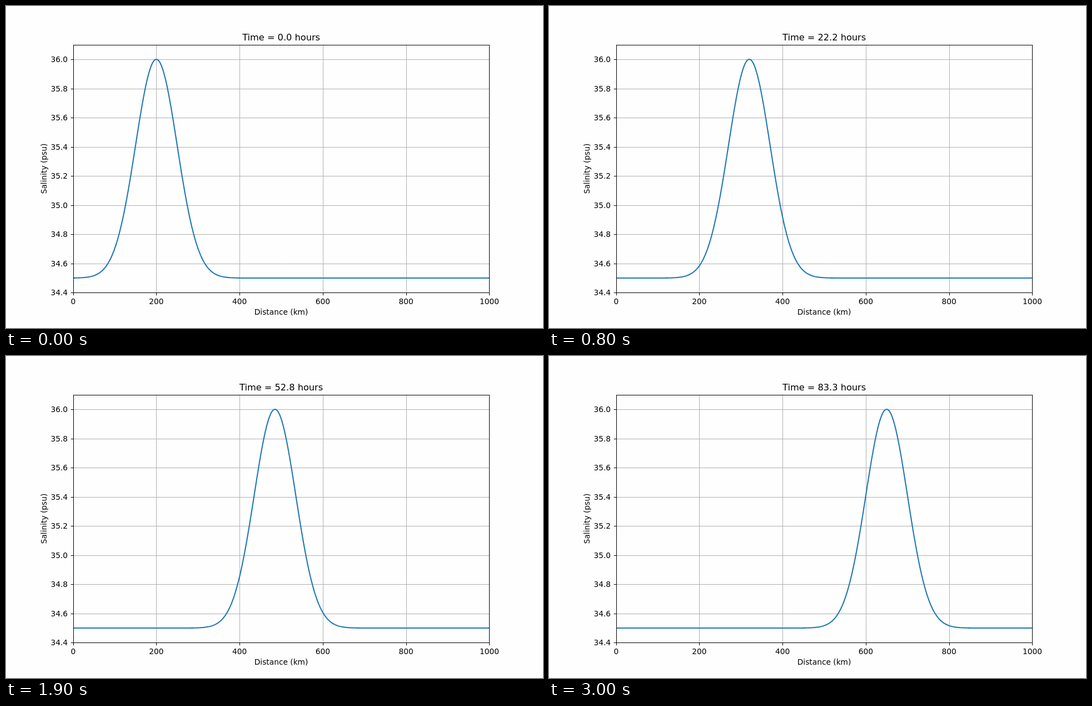
Write an HTML page with a canvas that moves like this. It is 966 by 580 pixels and loops after 3100 ms.

```html
<!DOCTYPE html>
<html lang="en">
<head>
<meta charset="utf-8">
<title>Salinity advection</title>
<style>
  html, body { margin: 0; width: 100%; height: 100%; overflow: hidden; background: #fefefe; }
  canvas { display: block; }
</style>
</head>
<body>
<canvas id="stage" width="966" height="580"></canvas>
<script>
const ctx = document.getElementById('stage').getContext('2d');
const W = 966, H = 580, PT = 100 / 72;
const LEFT = W * 0.125, RIGHT = W * 0.9, TOP = 69.7, BOTTOM = 516.3;
const MID_X = (LEFT + RIGHT) / 2, MID_Y = (TOP + BOTTOM) / 2;
const TICK = 3.5 * PT;
const STEP_MS = 100, STEPS = 31;
const STEP_KM = 15, STEP_HOURS = 10000 / 3600;
const BASE = 34.5, PEAK = 1.5, SIGMA = 50;

const toX = km => LEFT + (RIGHT - LEFT) * km / 1000;
const toY = psu => BOTTOM - (BOTTOM - TOP) * (psu - 34.4) / 1.7;
const snap = v => Math.floor(v + 0.5) + 0.5;
const xTicks = Array.from({ length: 6 }, (_, i) => i * 200);
const yTicks = Array.from({ length: 9 }, (_, i) => 34.4 + i * 0.2);

function line(x1, y1, x2, y2, color) {
  ctx.strokeStyle = color;
  ctx.lineWidth = 1;
  ctx.beginPath();
  ctx.moveTo(x1, y1);
  ctx.lineTo(x2, y2);
  ctx.stroke();
}

function label(text, x, y, align = 'center', size = 13.75) {
  ctx.font = `${size}px "DejaVu Sans", sans-serif`;
  ctx.textAlign = align;
  ctx.fillStyle = '#000';
  ctx.fillText(text, x, y);
}

function drawGrid() {
  for (const km of xTicks) line(snap(toX(km)), TOP, snap(toX(km)), BOTTOM, '#b0b0b0');
  for (const psu of yTicks) line(LEFT, snap(toY(psu)), RIGHT, snap(toY(psu)), '#b0b0b0');
}

function drawCurve(center) {
  ctx.save();
  ctx.beginPath();
  ctx.rect(LEFT, TOP, RIGHT - LEFT, BOTTOM - TOP);
  ctx.clip();
  ctx.beginPath();
  for (let km = 0; km <= 1000; km += 2) {
    const d = (km - center) / SIGMA;
    ctx.lineTo(toX(km), toY(BASE + PEAK * Math.exp(-d * d / 2)));
  }
  ctx.strokeStyle = '#1f77b4';
  ctx.lineWidth = 1.5 * PT;
  ctx.lineJoin = 'round';
  ctx.stroke();
  ctx.restore();
}

function drawAxes() {
  const l = snap(LEFT), r = snap(RIGHT), t = snap(TOP), b = snap(BOTTOM);
  for (const km of xTicks) {
    const x = toX(km);
    line(snap(x), b, snap(x), b + TICK, '#000');
    label(String(km), x, 537);
  }
  for (const psu of yTicks) {
    const y = toY(psu);
    line(l - TICK, snap(y), l, snap(y), '#000');
    label(psu.toFixed(1), LEFT - 2 * TICK, Math.round(y + 5), 'right');
  }
  ctx.strokeStyle = '#000';
  ctx.lineWidth = 1;
  ctx.strokeRect(l, t, r - l, b - t);
}

function drawTitles(hours) {
  label('Distance (km)', MID_X, 556);
  label(`Time = ${hours.toFixed(1)} hours`, MID_X, 62, 'center', 16.2);
  ctx.save();
  ctx.translate(73, MID_Y);
  ctx.rotate(-Math.PI / 2);
  label('Salinity (psu)', 0, 0);
  ctx.restore();
}

function draw(step) {
  ctx.fillStyle = '#fefefe';
  ctx.fillRect(0, 0, W, H);
  drawGrid();
  drawCurve(200 + step * STEP_KM);
  drawAxes();
  drawTitles(step * STEP_HOURS);
}

let start;
function animate(now) {
  start ??= now;
  draw(Math.floor(Math.max(0, now - start) / STEP_MS) % STEPS);
  requestAnimationFrame(animate);
}
draw(0);
requestAnimationFrame(animate);
</script>
</body>
</html>
```
